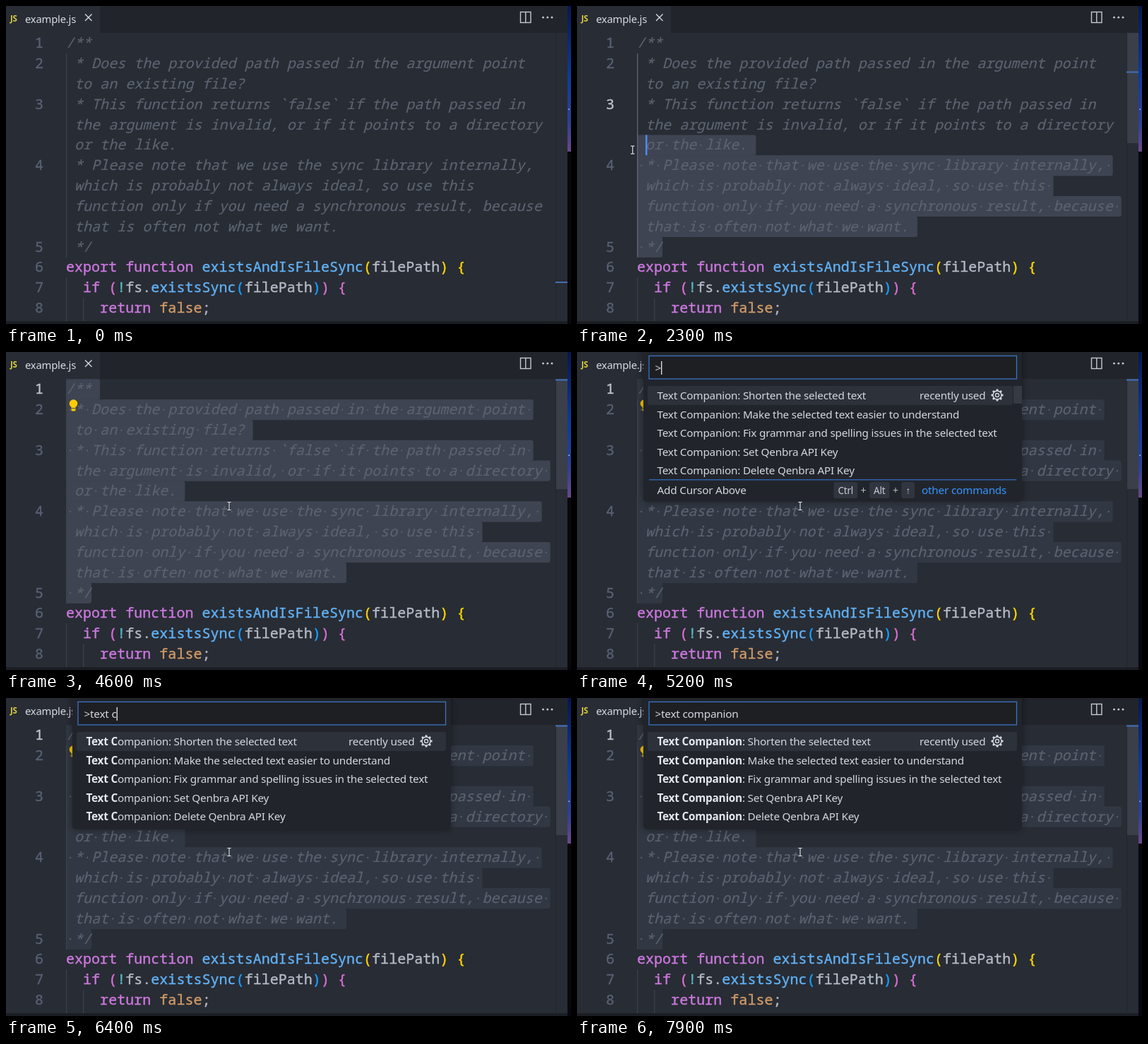
These frames come from a looping animation (800 px wide and 450 px high, 8000 ms). An HTML page with a canvas:

```html
<!DOCTYPE html>
<html lang="en">
<head>
<meta charset="utf-8">
<title>Editor</title>
<style>
html, body { margin: 0; width: 100%; height: 100%; overflow: hidden; background: #282c34; }
canvas { display: block; }
</style>
</head>
<body>
<canvas id="stage" width="800" height="450"></canvas>
<script>
const ctx = document.getElementById('stage').getContext('2d');
const LOOP = 8000, LEFT = 85, CHAR = 12.03, TOP = 38.3, ROW = 28.83, BASELINE = 20.9;
const MONO = '"Noto Sans Mono", monospace', SANS = '"Noto Sans", sans-serif';
const GREY = '#b4bac6', PURPLE = '#cb78de', BLUE = '#61b1f5', GOLD = '#ffd700', ORCHID = '#da70d6', LINK = '#3794ff';

// Each comment line is a list of its wrapped rows.
const comment = [
  ['/**'],
  [' * Does the provided path passed in the argument point ', 'to an existing file?'],
  [' * This function returns `false` if the path passed in ',
   'the argument is invalid, or if it points to a directory ', 'or the like.'],
  [' * Please note that we use the sync library internally, ',
   'which is probably not always ideal, so use this ',
   'function only if you need a synchronous result, because ', 'that is often not what we want.'],
  [' */'],
];
const rows = comment.flatMap((parts, line) => parts.map((text, i) => ({
  text, line, first: i === 0, indent: i ? 1 : 0,
  newline: i === parts.length - 1 && line < 4 ? 1 : 0,
})));
const code = [
  [['export function ', PURPLE], ['existsAndIsFileSync', BLUE], ['(', GOLD], ['filePath', GREY], [') {', GOLD]],
  [['  if ', PURPLE], ['(', ORCHID], ['!', '#56b6c2'], ['fs.', GREY], ['existsSync', BLUE], ['(', '#179fff'],
   ['filePath', GREY], [')', '#179fff'], [') {', ORCHID]],
  [['    return ', PURPLE], ['false', '#d19a66'], [';', GREY]],
];

// Pointer way points: time, x, y.
const path = [[400, 330, 425], [900, 185, 343], [1750, 185, 343], [2450, 50, 166], [2900, 48, 85],
  [3200, 48, 52], [3400, 48, 52], [4200, 316, 218]];
const QUERY = 'text companion';
const keyTimes = [5700, 5705, 5900, 6000, 6150, 6300, 6600, 6700, 6800, 6920, 7040, 7160, 7280, 7400];
const typedAt = t => keyTimes.filter(k => k <= t).length;
const rowY = i => TOP + ROW * i;
const clamp = (v, lo, hi) => Math.max(lo, Math.min(hi, v));

function rect(x, y, w, h, color, radius = 0) {
  ctx.fillStyle = color;
  ctx.beginPath();
  ctx.roundRect(x, y, w, h, radius);
  ctx.fill();
}

function line(color, width, ...points) {
  ctx.strokeStyle = color;
  ctx.lineWidth = width;
  ctx.beginPath();
  points.forEach(([x, y], i) => i ? ctx.lineTo(x, y) : ctx.moveTo(x, y));
  ctx.stroke();
}

// A hairline stroke gives the code font its slightly heavier weight.
function mono(text, x, y, color, { italic = false, weight = 0.4 } = {}) {
  ctx.font = `${italic ? 'italic ' : ''}20px ${MONO}`;
  ctx.letterSpacing = '0.03px';
  ctx.fillStyle = ctx.strokeStyle = color;
  ctx.lineWidth = weight;
  ctx.fillText(text, x, y);
  ctx.strokeText(text, x, y);
}

function sans(text, x, y, color = '#d3d7de', { bold = false, size = 15.3 } = {}) {
  ctx.font = `${bold ? 'bold ' : ''}${size}px ${SANS}`;
  ctx.letterSpacing = '-0.21px';
  ctx.fillStyle = color;
  ctx.fillText(text, x, y);
  return x + ctx.measureText(text).width;
}

function pointerAt(t) {
  if (t < path[0][0]) return null;
  const i = path.findIndex(p => p[0] > t);
  if (i < 0) return path.at(-1).slice(1);
  const [t0, x0, y0] = path[i - 1], [t1, x1, y1] = path[i];
  const k = (t - t0) / (t1 - t0);
  return [x0 + (x1 - x0) * k, y0 + (y1 - y0) * k];
}

function caretAt(t, pointer) {
  if (t < 1700) return null;
  if (t >= 3200) return { row: 0, col: 0 };
  const row = clamp(Math.floor((pointer[1] - TOP) / ROW), 0, 10);
  const { indent, text } = rows[row];
  return { row, col: clamp(Math.round((pointer[0] - LEFT) / CHAR), indent, indent + text.length) };
}

function drawSelection(caret, color) {
  rows.forEach(({ text, indent, newline }, i) => {
    if (i < caret.row) return;
    const start = i === caret.row && caret.col > indent ? caret.col : 0;
    const end = indent + text.length + newline;
    if (end > start) rect(LEFT + start * CHAR, rowY(i), (end - start) * CHAR, ROW + 0.3, color, [0, 3, 3, 0]);
  });
}

function drawDots(caret) {
  rows.forEach(({ text, indent }, i) => {
    if (i < caret.row) return;
    [...text].forEach((ch, c) => {
      const col = indent + c;
      if (ch === ' ' && (i > caret.row || col >= caret.col))
        rect(LEFT + col * CHAR + 5, rowY(i) + 13.5, 2.2, 2.2, '#5c6370', 1);
    });
  });
}

function drawEditor(t, caret, paletteOpen) {
  rect(0, 0, 800, 450, '#282c34');
  const selecting = caret && (caret.row < 10 || caret.col < 3);
  if (selecting) drawSelection(caret, paletteOpen ? '#323843' : '#3e4451');
  else if (caret) rect(LEFT, rowY(10), 694, ROW, '#2c313a');

  const bright = caret && caret.row > 0;
  rect(85, rowY(1), 1.3, ROW * 10, bright ? '#626772' : '#3d424b');
  rect(85, rowY(12), 1.3, 446 - rowY(12), '#3b4048');
  rect(109, rowY(13), 1.3, 446 - rowY(13), '#3b4048');

  const activeLine = caret ? rows[caret.row].line : -1;
  const number = (n, y) => mono(n + 1, 41, y, n === activeLine ? '#bcc2cd' : '#586174');
  rows.forEach(({ text, line: n, first, indent }, i) => {
    const y = rowY(i) + BASELINE;
    if (first) number(n, y);
    mono(text, LEFT + indent * CHAR, y, '#5c6370', { italic: true, weight: 0.2 });
  });
  code.forEach((tokens, i) => {
    const y = rowY(11 + i) + BASELINE;
    let x = LEFT;
    number(5 + i, y);
    for (const [text, color] of tokens) {
      mono(text, x, y, color);
      x += text.length * CHAR;
    }
  });
  if (selecting) drawDots(caret);
  if (caret && t < 4600) rect(LEFT + caret.col * CHAR, rowY(caret.row), 2.4, ROW, '#528bff');

  if (t >= 4600) {
    ctx.fillStyle = '#ffcc00';
    ctx.beginPath();
    ctx.arc(95.5, 73, 5.8, 0, 7);
    ctx.fill();
    rect(92.5, 77, 6, 6.5, '#ffcc00', 1);
    rect(92.5, 79.3, 6, 1, '#3e4451');
  }
}

function drawFrame(t, caret) {
  rect(778, 38, 1, 408, '#22262d');
  ctx.globalAlpha = clamp((t - 400) / 400, 0, 1);
  rect(779, 38, 16, 156, '#3a3f4a');
  ctx.globalAlpha = 1;
  rect(778, caret ? Math.max(38.5, 37 + 11.1 * caret.row) : 390, 17, 2, '#426fb8');
  rect(0, 446, 795, 4, '#1b1e23');

  const sky = ctx.createLinearGradient(0, 0, 0, 206);
  sky.addColorStop(0, '#08174f');
  sky.addColorStop(0.5, '#0f3c98');
  sky.addColorStop(0.8, '#2f3f90');
  sky.addColorStop(1, '#6a4886');
  rect(795, 0, 5, 206, sky);
  rect(795, 206, 5, 244, '#08070d');
  rect(796.5, 145.5, 1.5, 1.5, '#c5d3ef');

  rect(0, 0, 795, 38, '#21252b');
  rect(0, 0, 133, 38, '#282c34');
  sans('JS', 6, 21.5, '#d8cb3e', { bold: true, size: 11.5 });
  sans('example.js', 27, 23.5, '#d7dae0', { size: 14.8 });
  line('#d0d3d9', 1.4, [112, 11.5], [121.5, 21]);
  line('#d0d3d9', 1.4, [121.5, 11.5], [112, 21]);
  ctx.strokeStyle = '#c5c8ce';
  ctx.lineWidth = 1.4;
  ctx.strokeRect(728.5, 8.5, 14.5, 15);
  line('#c5c8ce', 1.4, [735.8, 8.5], [735.8, 23.5]);
  [760.5, 766.8, 773].forEach(x => rect(x - 1.4, 14.8, 2.8, 2.8, '#c5c8ce', 1.4));
}

function drawGear(x, y) {
  ctx.save();
  ctx.translate(x, y);
  ctx.strokeStyle = '#d3d7de';
  ctx.lineWidth = 1.4;
  for (const radius of [2.5, 6]) {
    ctx.beginPath();
    ctx.arc(0, 0, radius, 0, 7);
    ctx.stroke();
  }
  for (let i = 0; i < 8; i++) {
    rect(-1.4, -8.5, 2.8, 2.6, '#d3d7de');
    ctx.rotate(Math.PI / 4);
  }
  ctx.restore();
}

// Shortcut keys, laid out from the right edge.
function drawKeys(keys, right, y) {
  [...keys].reverse().forEach((key, i) => {
    ctx.font = `13.5px ${SANS}`;
    ctx.letterSpacing = '-0.21px';
    const width = ctx.measureText(key).width + 12;
    if (i) {
      sans('+', right - 12.5, y + 16.5, GREY, { size: 14 });
      right -= 17;
    }
    rect(right - width, y, width, 23, '#31353f', 3);
    sans(key, right - width + 6, y + 16.5, '#c8ccd4', { size: 13.5 });
    right -= width;
  });
}

function drawPalette(t) {
  const typed = typedAt(t), matched = typedAt(t - 95);
  const full = matched < 3;
  ctx.save();
  ctx.shadowColor = 'rgba(0,0,0,.45)';
  ctx.shadowBlur = 11;
  rect(94, -10, 536, full ? 222 : 196, '#21252b', 5);
  ctx.restore();
  rect(102, 5.5, 521, 33, '#1d1f23', 2);
  ctx.strokeStyle = '#3b72c4';
  ctx.lineWidth = 1.3;
  ctx.strokeRect(102, 5.5, 520.5, 32.5);
  const end = sans('>' + QUERY.slice(0, typed), 110.5, 28.3);
  if (t < 7900) rect(end, 13, 1.3, 19, '#e4e7ec');

  rect(100, 48, full ? 517 : 523, 27, '#2c313a', 3);
  const actions = ['Shorten the selected text', 'Make the selected text easier to understand',
    'Fix grammar and spelling issues in the selected text', 'Set Qenbra API Key', 'Delete Qenbra API Key'];
  actions.forEach((action, i) => {
    const label = 'Text Companion', y = 67.3 + 26.45 * i;
    const x = sans(label.slice(0, matched), 113.5, y, '#e4e7ec', { bold: true });
    sans(`${label.slice(matched)}: ${action}`, x, y);
  });
  sans('recently used', 485, 67.3);
  drawGear(595, 61);
  if (!full) return;

  rect(618, 48, 12, 25, '#353a43');
  rect(102, 180, 520, 1.4, '#315fae');
  const parts = matched ? ['Add Cursors ', 't', 'o Line ', 'E', 'nds'] : ['Add Cursor Above'];
  parts.reduce((x, part, i) => sans(part, x, 200.5, '#d3d7de', { bold: i % 2 === 1 }), 113.5);
  drawKeys(matched ? ['Shift', 'Alt', 'I'] : ['Ctrl', 'Alt', '↑'], 478, 184);
  sans('other commands', 488, 200.5, LINK);
}

function drawPointer([x, y]) {
  for (const [color, width] of [['#20242a', 3], ['#d5d8dd', 1.3]]) {
    line(color, width, [x, y - 5], [x, y + 5]);
    for (const dy of [-5.5, 5.5]) line(color, width, [x - 2.7, y + dy], [x + 2.7, y + dy]);
  }
}

function draw() {
  const t = performance.now() % LOOP;
  const pointer = pointerAt(t), caret = caretAt(t, pointer), paletteOpen = t >= 5100;
  drawEditor(t, caret, paletteOpen);
  drawFrame(t, caret);
  if (paletteOpen) drawPalette(t);
  if (pointer) drawPointer(pointer);
  requestAnimationFrame(draw);
}
draw();
</script>
</body>
</html>
```
